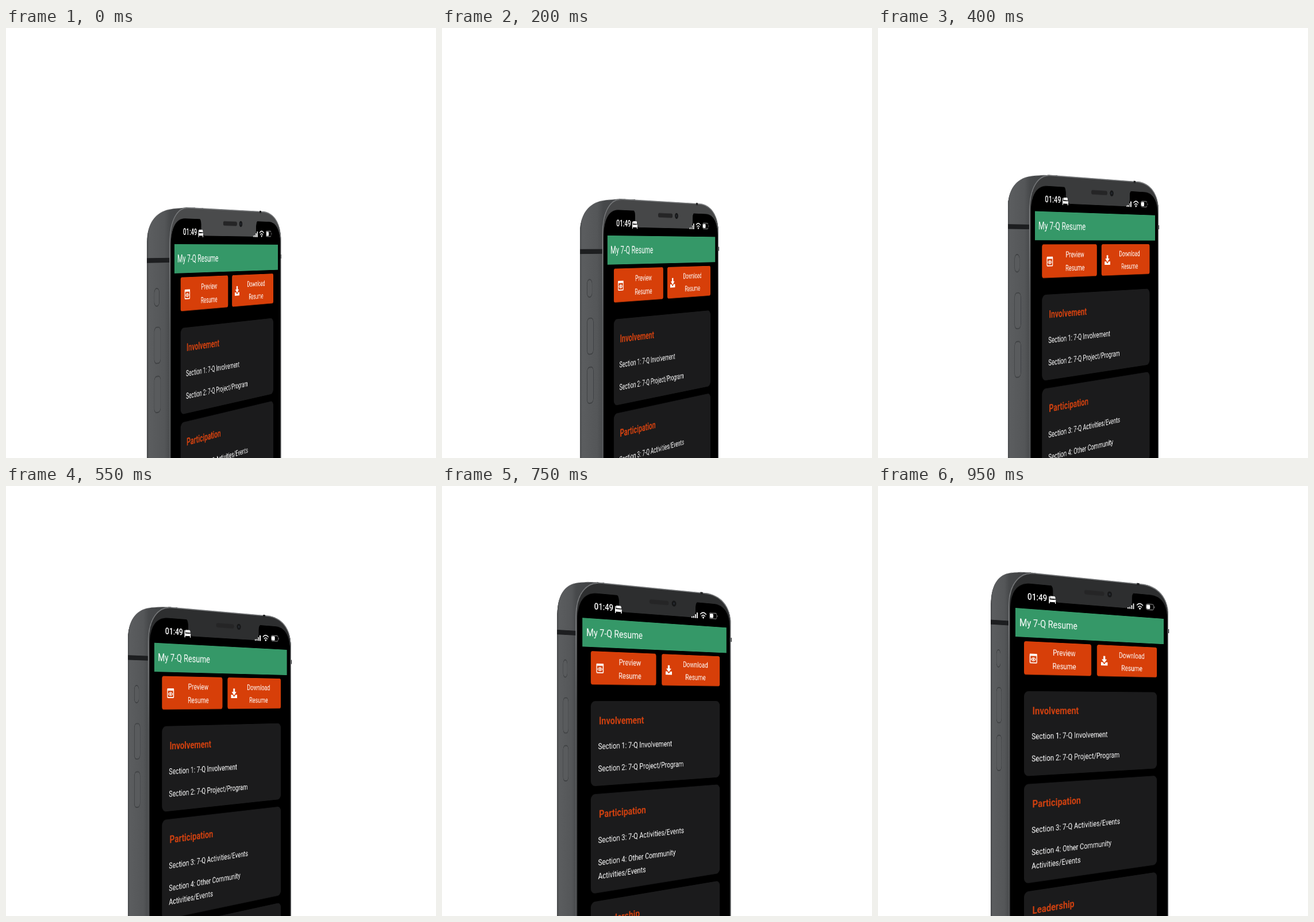
Animation, 748 px wide and 748 px high, one loop 1 s. Source, as an HTML page:

```html
<!DOCTYPE html>
<html lang="en">
<head>
<meta charset="utf-8">
<title>Phone</title>
<style>
html, body { margin: 0; width: 100%; height: 100%; overflow: hidden; background: #fff; }
main { position: fixed; inset: 0; overflow: hidden; contain: strict; }
#phone {
  position: absolute; left: 0; top: 0; width: 390px; height: 900px;
  overflow: visible; transform-origin: 0 0;
  font: 16.35px Roboto, Inter, sans-serif; fill: #fff;
}
#side { transform-origin: 0 0; }
.rim { fill: #4a4b4d; }
.head { font-size: 20.8px; font-weight: 700; fill: #d2410f; }
.mid { text-anchor: middle; }
.card { fill: #1b1b1c; }
.button { fill: #d73f09; }
.line { fill: none; stroke: #fff; stroke-width: 2; }
.thin { stroke-width: 1.5; }
.dim { stroke: #8b8b8b; stroke-width: 1.3; }
.key { fill: #595b5d; stroke: #3e4042; stroke-width: 1.8; }
</style>
</head>
<body>
<main>
<svg id="phone" viewBox="0 0 390 900">
  <defs>
    <linearGradient id="metal">
      <stop offset="0" stop-color="#47494b"/>
      <stop offset=".04" stop-color="#5b5d5f"/>
      <stop offset=".3" stop-color="#545658"/>
      <stop offset=".4" stop-color="#47494b"/>
      <stop offset="1" stop-color="#3c3d3f"/>
    </linearGradient>
    <linearGradient id="shine" x2="0" y2="1">
      <stop offset="0" stop-color="#77797b"/>
      <stop offset=".1" stop-color="#8b8d8f"/>
      <stop offset=".25" stop-color="#5f6163"/>
      <stop offset="1" stop-color="#55575a"/>
    </linearGradient>
  </defs>

  <!-- side wall: 100 wide, hinged on the front's left edge -->
  <g id="side">
    <path fill="url(#metal)" d="M-100 980V96C-100 62 -62 40 0 34Q60 28 160 28V980Z"/>
    <path fill="#1d1e20" d="M-100 126H10V135H-100Z"/>
    <g id="keys"></g>
  </g>

  <!-- front -->
  <path fill="#1d1e20" d="M398 122H406V131H398Z"/>
  <path class="rim" d="M-16 980V98C-16 54 8 28 46 28H323C373 28 404 52 404 92V980Z"/>
  <path fill="none" stroke="url(#shine)" stroke-width="2" d="M-15 980V98C-15 55 9 29 46 29H323C372 29 403 53 403 92V980"/>
  <path fill="#232425" d="M312 27H319V32H312Z"/>
  <path fill="#000" d="M-12 980V105C-12 70 4 50 36 50H350C383 50 400.500 68 400.500 102V980Z"/>
  <path class="rim" d="M80 47Q90 50 90 60V68Q90 83 105 83H283Q298 83 298 68V60Q298 50 308 47Z"/>
  <rect x="169" y="52.5" width="53" height="9" rx="4.5" fill="#252526"/>
  <circle cx="236.5" cy="57" r="6.2" fill="#161718"/>
  <circle cx="236.5" cy="57" r="2.4" fill="#262a31"/>

  <!-- status bar -->
  <text x="28.3" y="82.5" font-size="18.7" font-weight="500">01:49</text>
  <path d="M80 72H82V78H97V86H95V83H82V86H80ZM83 71H93Q96 71 96 76H83Z"/>
  <path d="M286 81h3v3h-3zM291 80h3v4h-3zM296 76h3v8h-3zM301 72h3v12h-3z"/>
  <path class="line" d="M311.5 75Q320.5 67 329.5 75M315 79Q320.5 74 326 79"/>
  <path d="M317.5 81Q320.5 78.5 323.5 81L320.5 84.5Z"/>
  <rect class="line dim" x="338.5" y="70.5" width="22" height="12" rx="3.5"/>
  <rect x="340" y="72" width="10" height="9" rx="2"/>
  <rect x="361.8" y="74.5" width="1.6" height="4" rx=".8" fill="#8b8b8b"/>

  <!-- title bar -->
  <rect y="100" width="390" height="56" fill="#359868"/>
  <text x="9.5" y="135" font-size="20.3">My 7-Q Resume</text>

  <!-- buttons -->
  <rect class="button" x="20" y="164" width="167.5" height="65.5" rx="4.5"/>
  <rect class="button" x="202.5" y="164" width="167.5" height="65.5" rx="4.5"/>
  <g class="mid">
    <text x="118.3" y="190.5">Preview</text>
    <text x="118.3" y="217">Resume</text>
    <text x="298" y="190.5">Download</text>
    <text x="298" y="217">Resume</text>
  </g>
  <rect class="line" x="34.5" y="189" width="16" height="17" rx="1.5"/>
  <path d="M34 188H51V192.5H34Z"/>
  <path class="line thin" d="M37 199Q42.5 192.5 48 199Q42.5 205.5 37 199Z"/>
  <circle cx="42.5" cy="199" r="1.9"/>
  <path d="M219.5 187H224.5V194H229L222 201.5L215 194H219.5ZM213 200H217.5L222 204.5L226.5 200H231V207H213Z"/>

  <!-- cards -->
  <rect class="card" x="20" y="262" width="350" height="167" rx="11"/>
  <rect class="card" x="20" y="444.8" width="350" height="195" rx="11"/>
  <rect class="card" x="20" y="656" width="350" height="240" rx="11"/>
  <g class="head">
    <text x="40" y="308.4">Involvement</text>
    <text x="40" y="492.4">Participation</text>
    <text x="40" y="702">Leadership</text>
  </g>
  <g id="rows"></g>
</svg>
</main>

<script>
const SVG = 'http://www.w3.org/2000/svg';
const byId = id => document.getElementById(id);
const mix = (a, b, t) => a + (b - a) * t;

function add(parent, tag, attrs, text = '') {
  const node = document.createElementNS(SVG, tag);
  for (const name in attrs) node.setAttribute(name, attrs[name]);
  node.textContent = text;
  byId(parent).append(node);
}

[[357.3, 'Section 1: 7-Q Involvement'],
 [401.5, 'Section 2: 7-Q Project/Program'],
 [541.7, 'Section 3: 7-Q Activities/Events'],
 [586, 'Section 4: Other Community'],
 [613, 'Activities/Events']
].forEach(([y, text]) => add('rows', 'text', { x: 38, y }, text));

// Side keys: top, height, width
[[183, 33, 22], [255.6, 67.5, 28], [347.5, 67.5, 28]].forEach(([y, height, width]) =>
  add('keys', 'rect', { class: 'key', x: -68, y, width, height, rx: 10, ry: 8 }));

// Progress of the turn, one value per 50 ms
const progress = [0, .005, .02, .05, .092, .143, .203, .273, .35, .44, .54, .63,
  .711, .783, .845, .895, .936, .968, .99, 1];

const WIDTH = 390, UNIT = .893, BAR = 100;

// Projects the flat screen between its left and right edges
function project(p, q) {
  const xl = mix(293, 239, q), xr = mix(473, 497, q);
  const kl = mix(1.018, 1, p) * UNIT, kr = mix(.876, .8834, p) * UNIT;
  const yl = mix(376, 212, p) - BAR * kl, yr = mix(376.8, 231, p) - BAR * kr;
  const depth = kl / kr;
  const slope = (l, r) => (r * depth - l) / WIDTH;
  return `matrix3d(${[
    slope(xl, xr), slope(yl, yr), 0, slope(1, 1),
    0, kl, 0, 0,
    0, 0, 1, 0,
    xl, yl, 0, 1
  ].map(n => n.toFixed(7))})`;
}

function play(node, pose) {
  const frames = progress.map((p, i) => ({
    ...pose(p, p + .08 * p * (1 - p)),
    offset: i / progress.length,
    easing: 'steps(1, end)'
  }));
  frames.push({ ...frames[frames.length - 1], offset: 1 });
  node.animate(frames, { duration: 1000, iterations: Infinity });
}

play(byId('phone'), (p, q) => ({ transform: project(p, q) }));
play(byId('side'), (p, q) => ({ transform: `translate(-16px, 0px) scale(${mix(.7, .4, q)}, 1)` }));
document.querySelectorAll('.rim').forEach(node => play(node, p => {
  const g = Math.round(mix(74, 45, Math.min(1, p * 1.6)));
  return { fill: `rgb(${g}, ${g + 1}, ${g + 2})` };
}));
</script>
</body>
</html>
```
